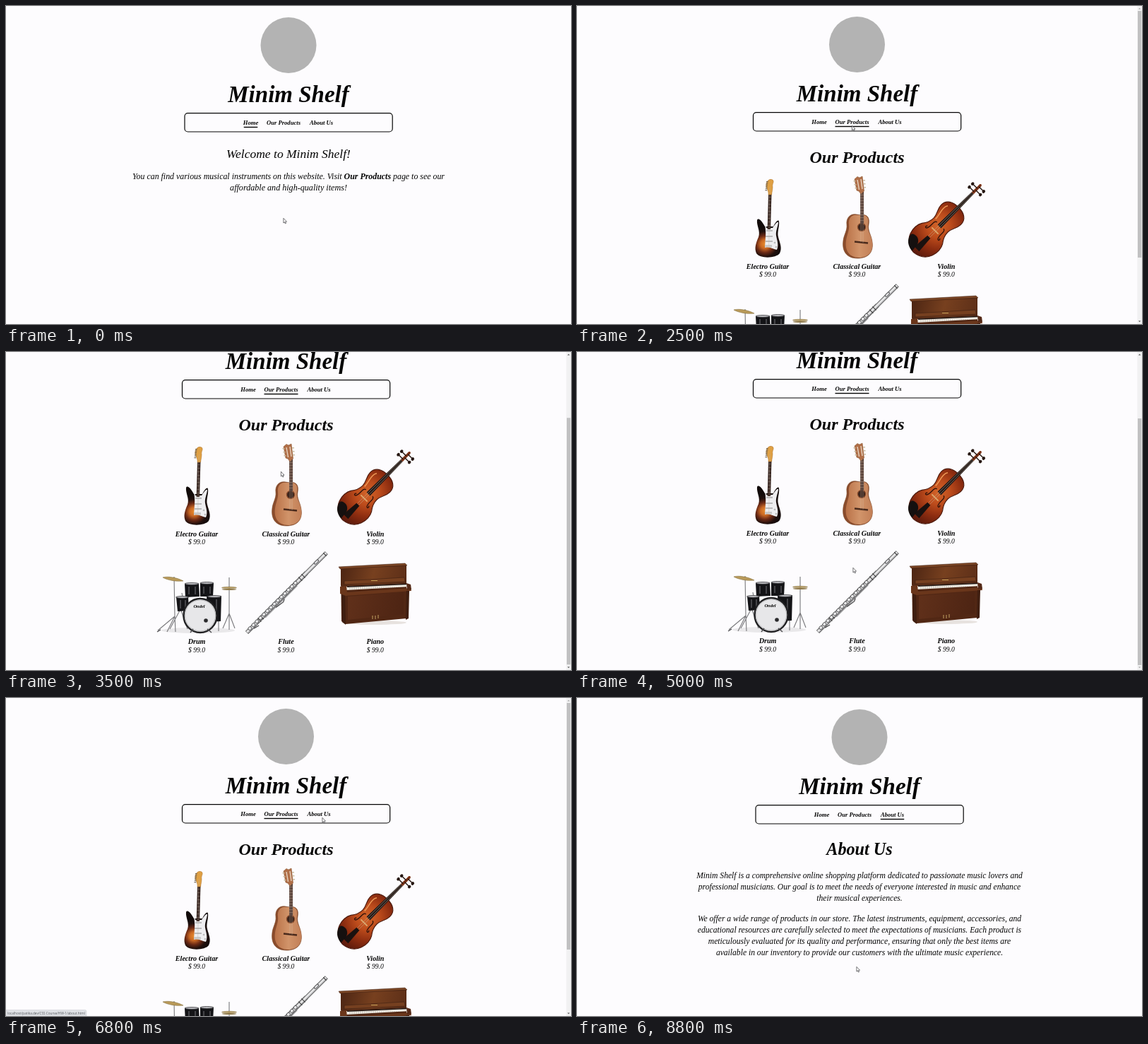
Write an HTML page with a canvas that moves like this. It is 800 px wide and 450 px high and loops after 9 s.

```html
<!DOCTYPE html>
<html lang="en">
<head>
<meta charset="utf-8">
<title>Minim Shelf</title>
<style>
  html, body { margin: 0; width: 100%; height: 100%; overflow: hidden; background: #fdfcfe; }
  canvas { display: block; width: 800px; height: 450px; }
</style>
</head>
<body>
<canvas id="stage"></canvas>
<script>
const canvas = document.getElementById('stage');
const ctx = canvas.getContext('2d');
const dpr = window.devicePixelRatio || 1;
canvas.width = 800 * dpr;
canvas.height = 450 * dpr;

const LOOP = 9000, STEP = 100;
const INK = '#050505';
const SERIF = '"Liberation Serif", "Times New Roman", serif';
const SHOP = 'Minim Shelf';
const BASE_URL = 'localhost/patika.dev/CSS Course/HW-1/';

// [time, x, y] of the pointer tip
const POINTER = [
  [0, 392.5, 300], [100, 392, 296], [1000, 389.5, 187], [1300, 389, 169],
  [3700, 389, 169], [4300, 389.5, 323], [4400, 389.5, 323], [4800, 390.5, 305],
  [5000, 390.5, 305], [5400, 392.5, 296], [5900, 399.5, 303], [6200, 447.5, 169],
  [7600, 447.5, 169], [8600, 395.5, 338], [8800, 395.5, 380]
];
// [time, offset] of the page scroll
const SCROLL = [
  [3100, 0], [3200, 25], [3300, 64], [3400, 97], [3500, 111], [3600, 112],
  [5000, 112], [5100, 88], [5200, 46], [5300, 12], [5400, 0]
];

function sample(keys, t, i) {
  if (t <= keys[0][0]) return keys[0][i];
  for (let k = 1; k < keys.length; k++) {
    const a = keys[k - 1], b = keys[k];
    if (t <= b[0]) return a[i] + (b[i] - a[i]) * (t - a[0]) / (b[0] - a[0]);
  }
  return keys[keys.length - 1][i];
}

const font = (size, bold) => `italic ${bold ? 700 : 400} ${size}px ${SERIF}`;

function text(str, x, y, size, bold, align = 'center') {
  ctx.font = font(size, bold);
  ctx.textAlign = align;
  ctx.fillStyle = INK;
  ctx.fillText(str, x, y);
}

// Centred line made of [string, bold] runs
function runs(parts, cx, y, size) {
  const widths = parts.map(([s, bold]) => {
    ctx.font = font(size, bold);
    return ctx.measureText(s).width;
  });
  let x = cx - widths.reduce((a, b) => a + b) / 2;
  parts.forEach(([s, bold], i) => {
    text(s, x, y, size, bold, 'left');
    x += widths[i];
  });
}

function shape(d, fill, stroke, width = 1) {
  const p = new Path2D(d);
  if (fill) { ctx.fillStyle = fill; ctx.fill(p); }
  if (stroke) { ctx.strokeStyle = stroke; ctx.lineWidth = width; ctx.stroke(p); }
}

function oval(x, y, rx, ry, fill, stroke, width = 1) {
  ctx.beginPath();
  ctx.ellipse(x, y, rx, ry, 0, 0, Math.PI * 2);
  if (fill) { ctx.fillStyle = fill; ctx.fill(); }
  if (stroke) { ctx.strokeStyle = stroke; ctx.lineWidth = width; ctx.stroke(); }
}

function box(x, y, w, h, fill) {
  ctx.fillStyle = fill;
  ctx.fillRect(x, y, w, h);
}

function radial(x, y, r, ...colors) {
  const g = ctx.createRadialGradient(x, y, 0, x, y, r);
  colors.forEach((c, i) => g.addColorStop(i / (colors.length - 1), c));
  return g;
}

function linear(x0, y0, x1, y1, ...colors) {
  const g = ctx.createLinearGradient(x0, y0, x1, y1);
  colors.forEach((c, i) => g.addColorStop(i / (colors.length - 1), c));
  return g;
}

function at(x, y, angle, scale, draw) {
  ctx.save();
  ctx.translate(x, y);
  ctx.rotate(angle);
  ctx.scale(scale, scale);
  draw();
  ctx.restore();
}

function electricGuitar() {
  shape('M266 312C263 306 257 298 255 303C254 311 260 318 257 327C253 336 251 343 254 350C259 358 282 357 287 350C291 342 287 335 285 327C283 320 287 312 286 305C285 301 281 306 278 312Z',
    radial(266, 337, 24, '#e58a2e', '#cc6a24', '#6c2a15', '#1f0f0c', '#120b0a'));
  shape('M267 306C265 309 268 316 267 326L266 342C271 339 276 344 283 345C286 338 283 331 282 325C281 318 285 311 285 306C283 305 280 310 277 314L268 314Z', '#eeeef0');
  shape('M268 318L277 318M267 326L277 326M267 333L277 333', null, '#a9a9a9', 1.6);
  box(266, 338, 10, 3.5, '#c9c9c9');
  oval(280, 335, 1.3, 1.3, '#bbb');
  oval(282, 341, 1.3, 1.3, '#bbb');
  shape('M273.3 265L271.8 316', null, '#33211c', 4.4);
  for (let y = 270; y < 314; y += 5) box(270.3, y, 4.4, .5, '#8c7d72');
  shape('M271 267C272 261 267 258 268 252C269 247 273 244 277 246C280 249 276 251 277 256C277 260 276 263 275.5 267Z', '#dfa044', '#a86c27', .5);
  for (let i = 0; i < 6; i++) box(266.5 + i * .3, 260 - i * 2.4, 2.6, 1.2, '#6d6254');
  shape('M273 256L271.7 339', null, '#b8aca0', .4);
}

function classicalGuitar() {
  shape('M396 295C386 293 381 301 382 309C383 318 378 323 377 332C375 346 381 357 397 357C413 357 420 348 418 334C417 324 411 318 413 309C415 299 410 294 402 296Z',
    '#8a4c2c', '#78401f', .6);
  shape('M397 296C388 294 384 302 385 309C386 318 382 323 381 332C379 346 385 355.5 399 356C413 356 420 347 418 334C417 324 410 318 412 309C414 300 410 295 402 296Z',
    linear(382, 330, 418, 330, '#bb744a', '#d1946a', '#c27f57'));
  oval(403, 313, 5.6, 5.6, '#3b251d', '#8d4f2f', 1.2);
  shape('M393 333.5L412 335.5', null, '#4a2a1c', 2.4);
  shape('M403.6 263L403.6 308', null, '#49322c', 5);
  for (let y = 267; y < 306; y += 4) box(401, y, 5, .5, '#a58b7a');
  shape('M393 245L397 241.5L400 243L404 241L406.5 262L402 266L399 262L396 261Z', '#b06f48', '#8a5531', .6);
  shape('M397 246L399.5 260M402 245L404 259', null, '#e8d5c3', 1.4);
  for (let i = 0; i < 3; i++) {
    box(391.5 + i, 247 + i * 5, 3, 1.4, '#c7b89b');
    box(405 + i * .5, 246 + i * 5, 3, 1.4, '#c7b89b');
  }
  shape('M402.5 264L402 334M404.8 264L405 335', null, '#d9c8b4', .4);
}

function violin() {
  at(509, 316, Math.PI / 4, .94, () => {
    shape('M0 -47C12 -47 21 -42 21 -31C21 -22 15 -18 15 -9C15 -1 18 4 22 9C29 20 26 46 0 49C-26 46 -29 20 -22 9C-18 4 -15 -1 -15 -9C-15 -18 -21 -22 -21 -31C-21 -42 -12 -47 0 -47Z',
      radial(-2, -6, 54, '#d2652a', '#bd4c1c', '#8d2d10', '#5a1a0c'), '#4a180c', 1.2);
    shape('M-13 -37C-18 -30 -12 -20 -12 -10', null, '#ed9a58', 1.6);
    for (const s of [-1, 1]) {
      shape(`M${7 * s} -8C${13 * s} -8 ${8 * s} 4 ${12 * s} 9C${15 * s} 11 ${15 * s} 7 ${13 * s} 6`, null, '#2d120b', 1.4);
    }
    shape('M-7 3L7 3', null, '#dda66b', 2);
    shape('M-3 16L3 16L5 42L-5 42Z', '#19110f');
    shape('M-22 32C-17 26 -6 28 -4 38L-3 49C-14 48 -21 42 -22 32Z', '#15100f');
    shape('M-2.2 -78L2.2 -78L3.6 -6L-3.6 -6Z', '#221a18');
    shape('M-2.2 -77L2.2 -77L2 -91C3 -97 -3 -97 -2 -91Z', '#7b3217');
    for (let i = 0; i < 4; i++) {
      const s = i % 2 ? 1 : -1, y = -80 - i * 3.5;
      shape(`M0 ${y}L${9 * s} ${y}`, null, '#251611', 1.5);
      oval(10 * s, y, 2.2, 2.6, '#251611');
    }
    shape('M-1.2 -78L-1.6 16M1.2 -78L1.6 16', null, '#c5ad94', .5);
  });
}

function drums() {
  oval(272, 393, 52, 4, '#e9e8ea');
  shape('M238 317L239 373L215 393M239 373L240 395M239 373L228 395M246 365L232 391M248 365L257 391M316 318L316 392M316 369L307 390M316 369L324 390M301 377L301 394M249 340L253 365', null, '#77777a', 1.1);
  shape('M253 327L273 327L274 345L254 346ZM275 326L294 326L293 345L275 345ZM241 346L258 345L259 365L243 366ZM284 345L305 344L304 380L286 381Z', '#141417');
  for (const [x, y, r] of [[263, 327, 10], [284.5, 326, 9.5], [249.5, 346, 9], [295, 345, 10]]) {
    oval(x, y, r, 1.4, '#c4c4c8', '#2f2f33', .8);
  }
  shape('M259 331L259 342M268 331L268 342M280 331L280 341M289 331L289 341M247 350L247 362M254 350L254 362M298 349L298 377', null, '#8f8f95', .8);
  oval(275, 372, 23.5, 24, '#e7e7e9', '#202022', 2.4);
  oval(275, 372, 21.5, 22, null, '#b0b0b3', .8);
  text('Ondel', 273.5, 361, 6.5, true);
  oval(283, 379, 2.8, 2.8, '#2a2a2c');
  shape('M222 318C229 316 242 318 251 323C240 324 229 322 222 318Z', '#b99a5a', '#77622f', .5);
  oval(316, 332.5, 10.5, 1.2, '#bba064', '#786437', .5);
  oval(316, 335, 10.5, .9, '#8f7949');
  shape('M265 391L261 396M285 391L291 396M214 395L219 392', null, '#4b4b4e', 1.4);
}

function flute() {
  at(397, 340, -Math.PI / 4, 1, () => {
    shape('M-79 -2.6L-50 -2.6L-50 -3L40 -3L40 -2.6L80 -2.6L80 2.6L40 2.6L40 3L-79 2.6Z',
      linear(0, -3, 0, 3, '#4c4c4e', '#f4f4f4', '#d1d1d3', '#3d3d3f'), '#464648', .6);
    shape('M-54 -3.6L-54 3.6M-49 -3.6L-49 3.6M28 -3.6L28 3.6M34 -3.6L34 3.6M77 -3L77 3', null, '#333', 1);
    shape('M-46 3.8L18 3.8', null, '#717173', .9);
    for (let x = -72; x < 22; x += 7) oval(x, -1, 2.6, 2.4, '#e7e7e8', '#3d3d3f', .8);
    shape('M-25 4L-12 6L-8 4M-68 3L-60 5', null, '#404042', 1.2);
    oval(61, -1, 4, 1.8, '#dcdcde', '#363638', .8);
  });
}

function piano() {
  oval(521, 382, 46, 3, '#e7e2df');
  shape('M474 304L567 300L567 376L481 384L475 380Z', '#512714');
  shape('M474 305L566 302L566 325L474 330Z', linear(474, 302, 566, 325, '#4c2513', '#77401f', '#5d2f18'));
  shape('M471 303L565 298L568 301L473 306Z', '#7b4625', '#3d1d0f', .5);
  shape('M479 323L564 318L565 324L479 328Z', '#764020', '#351b10', .5);
  box(517, 322, 9, 1, '#c5a057');
  shape('M482 331L567 327L572 331L482 336Z', '#f2eee5');
  shape('M483 331.2L567 327.5', null, '#241813', 1.5);
  for (let x = 487; x < 570; x += 3) shape(`M${x} 331L${x} ${335.8 - (x - 482) * .055}`, null, '#77706a', .4);
  shape('M473 331L482 330L483 339L573 333L574 337L481 344L473 341Z', '#6a361b');
  shape('M567 326L573 328L574 335L568 336Z', '#542917');
  shape('M484 345L563 339L563 370L484 378Z', linear(484, 350, 563, 365, '#60301a', '#4d2413'));
  shape('M475 342L480 344L481 385L476 381ZM567 337L571 337L570 376L566 378Z', '#3f1e10');
  shape('M519 372L519 377M523 372L523 377M527 371L527 376', null, '#c3a263', 1);
}

const PRODUCTS = [
  ['Electro Guitar', electricGuitar], ['Classical Guitar', classicalGuitar], ['Violin', violin],
  ['Drum', drums], ['Flute', flute], ['Piano', piano]
];
const NAV = [['Home', 346.5, 19.5], ['Our Products', 393, 48], ['About Us', 446.5, 33.5]];

function header(active) {
  oval(400, 55.5, 39.5, 39.5, '#b3b3b3');
  text(SHOP, 400, 136, 33, true);
  ctx.beginPath();
  ctx.roundRect(253, 151.6, 294.2, 26.4, 4.5);
  ctx.strokeStyle = INK;
  ctx.lineWidth = 1.2;
  ctx.stroke();
  NAV.forEach(([label, x, w], i) => {
    text(label, x, 168, 8.6, true);
    if (i === active) box(x - w / 2, 170.8, w, 1.4, INK);
  });
}

function homePage() {
  header(0);
  text(`Welcome to ${SHOP}!`, 400, 215, 17.5);
  runs([
    ['You can find various musical instruments on this website. Visit ', false],
    ['Our Products', true],
    [' page to see our', false]
  ], 400, 245, 11.9);
  text('affordable and high-quality items!', 400, 261, 12.1);
}

const ABOUT = [
  `${SHOP} is a comprehensive online shopping platform dedicated to passionate music lovers and`,
  'professional musicians. Our goal is to meet the needs of everyone interested in music and enhance',
  'their musical experiences.',
  'We offer a wide range of products in our store. The latest instruments, equipment, accessories, and',
  'educational resources are carefully selected to meet the expectations of musicians. Each product is',
  'meticulously evaluated for its quality and performance, ensuring that only the best items are',
  'available in our inventory to provide our customers with the ultimate music experience.'
];

function aboutPage() {
  header(2);
  text('About Us', 400, 222, 24.2, true);
  ABOUT.forEach((line, i) => text(line, 400, 255 + i * 16 + (i > 2 ? 13 : 0), 11.6));
}

function productsPage(scroll) {
  ctx.save();
  ctx.translate(0, -scroll);
  ctx.save();
  ctx.translate(-3.5, -1);
  header(1);
  ctx.restore();
  text('Our Products', 396.5, 222, 24, true);
  PRODUCTS.forEach(([name, draw], i) => {
    const x = 270 + (i % 3) * 126.4, row = i > 2 ? 1 : 0;
    ctx.save();
    ctx.translate(0, row * 112);
    draw();
    ctx.restore();
    text(name, x, 372 + row * 152, 10.1, true);
    text('$ 99.0', x, 383 + row * 152.5, 9.6);
  });
  ctx.restore();
  scrollbar(scroll);
}

function scrollbar(scroll) {
  box(793.3, 0, 6.7, 450, '#f1f1f2');
  box(794, 7 + scroll * .777, 5.2, 349, '#c1c1c2');
  shape('M794.9 4.6L796.6 2.8L798.3 4.6Z', scroll > 0 ? '#505050' : '#a3a3a3');
  shape('M794.9 445.4L796.6 447.2L798.3 445.4Z', scroll < 112 ? '#505050' : '#a3a3a3');
}

function statusBar(page) {
  ctx.font = '4.7px "Open Sans", sans-serif';
  const w = ctx.measureText(BASE_URL + page).width + 4;
  ctx.beginPath();
  ctx.roundRect(-1, 441.4, w + 1, 10, [0, 2, 0, 0]);
  ctx.fillStyle = '#dfe1e5';
  ctx.fill();
  ctx.strokeStyle = '#c6c8cc';
  ctx.lineWidth = .5;
  ctx.stroke();
  ctx.fillStyle = '#55585d';
  ctx.textAlign = 'left';
  ctx.fillText(BASE_URL + page, 2, 447.5);
}

function pointer(x, y) {
  at(x, y, 0, 1, () => {
    shape('M.4 .3L.4 7L1.9 5.7L2.9 8L4 7.5L3 5.3L5 5.2Z', '#fff', '#3c3c3f', .7);
  });
}

function render(now) {
  const t = Math.floor((now % LOOP) / STEP) * STEP;
  ctx.setTransform(dpr, 0, 0, dpr, 0, 0);
  box(0, 0, 800, 450, '#fdfcfe');
  if (t < 2100) homePage();
  else if (t < 7000) productsPage(sample(SCROLL, t, 1));
  else aboutPage();
  if (t >= 1300 && t < 2400) statusBar('products.html');
  if (t >= 6400 && t < 7200) statusBar('about.html');
  pointer(sample(POINTER, t, 1), sample(POINTER, t, 2));
}

const start = performance.now();
function tick() {
  render(performance.now() - start);
  requestAnimationFrame(tick);
}
tick();
</script>
</body>
</html>
```
